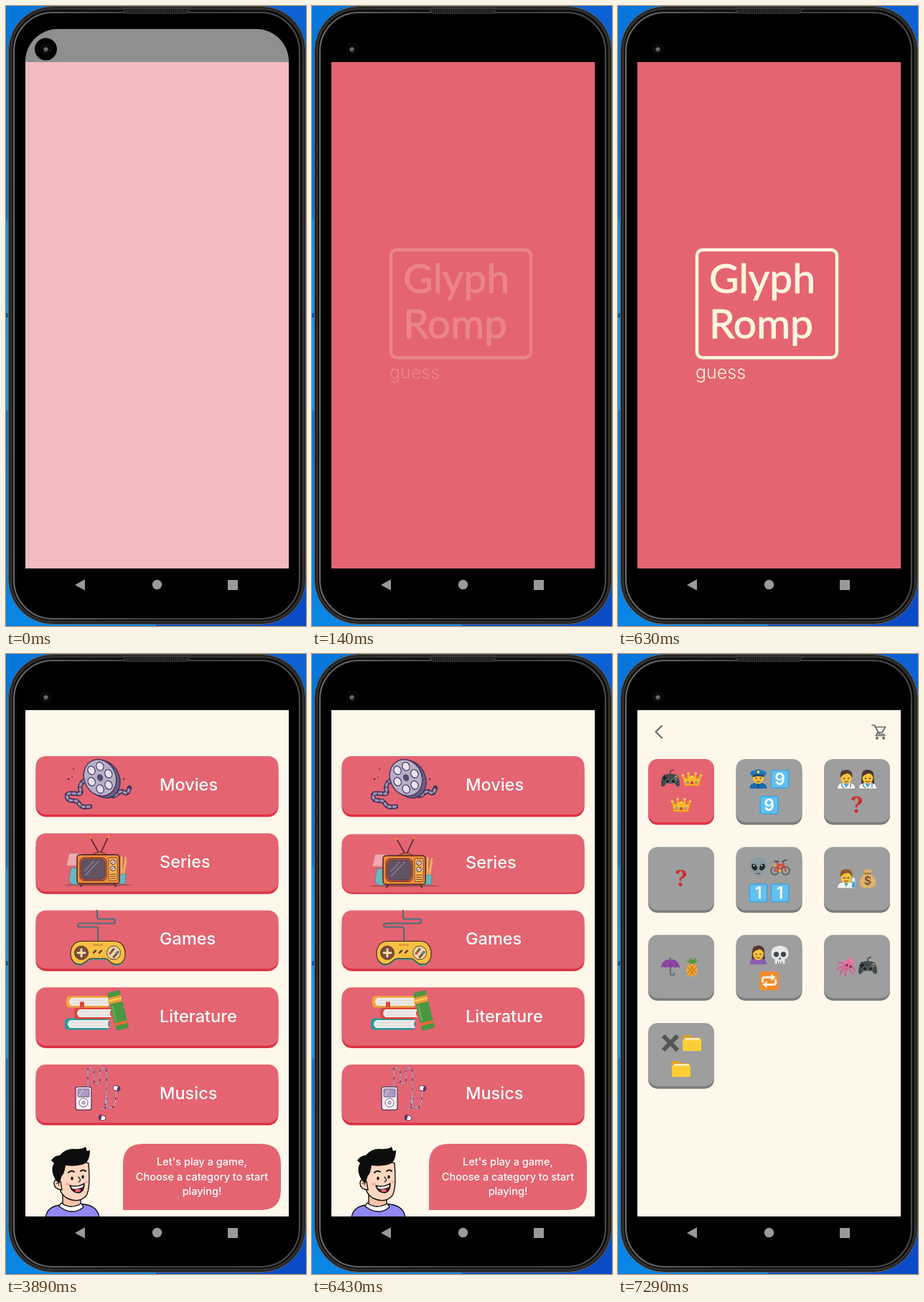
These frames come from a looping animation (418 px wide and 862 px high, 8 s). An HTML page:

```html
<!DOCTYPE html>
<html lang="en">
<head>
<meta charset="utf-8">
<title>Guessing app</title>
<style>
html, body { margin: 0; width: 100%; height: 100%; overflow: hidden; background: #000; }
svg { display: block; width: 100vw; height: 100vh; }
text { font-family: Inter, "Open Sans", sans-serif; }
</style>
</head>
<body>
<svg id="stage" viewBox="0 0 418 862" preserveAspectRatio="none">
  <defs>
    <linearGradient id="left" x2="0" y2="1">
      <stop offset="0" stop-color="#0876da"/><stop offset=".34" stop-color="#0678da"/>
      <stop offset=".35" stop-color="#1292ec"/><stop offset=".65" stop-color="#169cf4"/>
      <stop offset=".655" stop-color="#0878dc"/><stop offset="1" stop-color="#0a86e4"/>
    </linearGradient>
    <linearGradient id="right" x2="0" y2="1">
      <stop offset="0" stop-color="#0c62d4"/><stop offset="1" stop-color="#0b4cc6"/>
    </linearGradient>
    <linearGradient id="rim" x2="1" y2="0">
      <stop offset="0" stop-color="#6c6c6c"/><stop offset=".5" stop-color="#3c3c3c"/><stop offset="1" stop-color="#4a4a4a"/>
    </linearGradient>
    <pattern id="mesh" width="3" height="3" patternUnits="userSpaceOnUse">
      <rect width="3" height="3" fill="#161616"/><circle cx="1" cy="1" r=".8" fill="#5e5e5e"/>
    </pattern>
    <clipPath id="screen"><path d="M27 782V77A45 45 0 0 1 72 32H349A45 45 0 0 1 394 77V782Z"/></clipPath>
  </defs>

  <rect width="209" height="862" fill="url(#left)"/>
  <rect x="209" width="209" height="862" fill="url(#right)"/>
  <path d="M0 430H4" stroke="#075aa8" stroke-width="6"/>
  <path d="M417 332V450" stroke="#222" stroke-width="3"/>
  <rect x="3.5" y=".5" width="414" height="859" rx="62" fill="#1d1d1d" stroke="#67615d"/>
  <rect x="7" y="4" width="407" height="852" rx="58" fill="#080808" stroke="#303030" stroke-width="3"/>
  <rect x="11" y="9" width="398" height="843" rx="54" fill="#060606" stroke="url(#rim)" stroke-width="2"/>
  <rect x="15" y="12" width="391" height="837" rx="50"/>
  <path d="M163 3H257L253 10H167Z" fill="url(#mesh)" stroke="#444"/>

  <g clip-path="url(#screen)">
    <g id="splash">
      <rect x="27" y="78" width="367" height="704" fill="#e56471"/>
      <g id="logo" fill="#fff5e1">
        <rect x="110" y="339" width="195" height="150" rx="8" fill="none" stroke="#fff5e1" stroke-width="4.4"/>
        <g style="font:57px Lato,sans-serif" stroke="#fff5e1" stroke-width="1" stroke-linejoin="round">
          <text x="127" y="399" style="font:inherit">Glyph</text>
          <text x="127" y="462" style="font:inherit">Romp</text>
        </g>
        <text x="108" y="518" font-size="25" font-weight="300">guess</text>
      </g>
      <rect id="veil" x="27" y="32" width="367" height="750" fill="#fff"/>
    </g>
    <g id="menu"></g>
    <g id="levels"></g>
  </g>

  <circle cx="55.5" cy="60" r="15.5"/>
  <circle cx="55.5" cy="60" r="9" fill="#090909"/>
  <circle cx="55.5" cy="60.5" r="3.2" fill="#555"/>
  <path d="M53.5 59l2 2M56 58.500l1.500 1" stroke="#aaa"/>
  <path d="M96 805L110 797V812.500Z" fill="#999"/>
  <circle cx="210.500" cy="804.500" r="6.700" fill="#999"/>
  <rect x="309" y="798" width="14" height="14" fill="#999"/>
</svg>
<script>
const LOOP = 8000, CREAM = '#fff8ea', PINK = '#e56471', RED = '#dc3345';
const byId = id => document.getElementById(id);
const rect = (x, y, w, h, r, fill, more = '') =>
  `<rect x="${x}" y="${y}" width="${w}" height="${h}" rx="${r}" fill="${fill}" ${more}/>`;
const disc = (x, y, r, fill, more = '') => `<circle cx="${x}" cy="${y}" r="${r}" fill="${fill}" ${more}/>`;
const oval = (x, y, rx, ry, fill, more = '') =>
  `<ellipse cx="${x}" cy="${y}" rx="${rx}" ry="${ry}" fill="${fill}" ${more}/>`;
const path = (d, fill, more = '') => `<path d="${d}" fill="${fill}" ${more}/>`;
const line = (d, color, w = 1, more = '') =>
  path(d, 'none', `stroke="${color}" stroke-width="${w}" stroke-linecap="round" stroke-linejoin="round" ${more}`);
const ink = (color, w = 1) => `stroke="${color}" stroke-width="${w}" stroke-linejoin="round"`;
const move = (x, y, body, more = '') => `<g transform="translate(${x} ${y}) ${more}">${body}</g>`;
const label = (x, y, size, str, more = '') => `<text x="${x}" y="${y}" font-size="${size}" ${more}>${str}</text>`;

// Category pictures, placed relative to the top of their button
function reel() {
  const tape = 'M121 42C112 26 100 38 104 48S84 46 85 56S97 58 101 65S109 71 117 70M146 53C152 61 157 45 164 50S171 45 172 44';
  let holes = '';
  for (let i = 0; i < 6; i++) {
    const a = i * Math.PI / 3;
    holes += oval(13 * Math.cos(a), 16.5 * Math.sin(a), 5, 6, '#e6e2ee', ink('#51406b', 1.3));
  }
  return line(tape, '#46365c', 6.5) + line(tape, '#a596b4', 3.2, 'stroke-dasharray="3 4"') +
    move(136, 32, oval(0, 0, 22, 27, '#6c5e83', ink('#46365c', 1.5)), 'rotate(-25)') +
    move(131, 30, oval(0, 0, 22, 26, '#b6afc6', ink('#46365c', 1.5)) + holes + oval(0, 0, 4, 5, '#5a4972'), 'rotate(-25)') +
    disc(87, 32, 1.3, '#46365c') + disc(94, 18, 1, '#46365c') + disc(164, 32, 1.2, '#46365c') + disc(92, 29, .8, '#46365c');
}

function tv() {
  const dark = '#5d2c35';
  return oval(128, 72, 49, 1.3, '#9d5044') +
    path('M91 48H102L106 62Q106 70 101 71H93Q87 69 88 61Z', '#6cb6bf', ink('#4a7f8b', .7)) +
    path('M88 28H106L109 45H84Z', '#efa9af', ink('#c67d86', .8)) +
    line('M158 58L156 37M161 58L161 33M164 58L167 34M167 40L164 52', '#e4b95a', 2.5) +
    path('M149 57H168Q165 64 167 70H151Z', '#65b6be', ink('#437f8b', .7)) +
    line('M131 30L118 7M131 30L142 6', dark, 1.8) + disc(118, 6, 2, '#f08a35') + disc(142, 5, 2, '#f08a35') +
    path('M120 30Q130 22 141 30Z', '#d96a36', ink(dark)) +
    line('M106 71l-2 3M151 71l2 3', dark, 2) +
    rect(99, 30, 59, 40, 4, '#f18d35', ink(dark, 1.7)) +
    rect(103, 34, 37, 32, 6, '#c35f36', ink(dark)) + rect(105, 36, 33, 28, 6, '#615364', ink(dark, .7)) +
    line('M110 52L122 39M111 58L129 39', '#83748a', 2) +
    rect(143, 34, 12, 32, 2, '#ffb64a', ink(dark, .8)) +
    disc(149, 40, 3.4, '#e8e0d4', ink(dark)) + disc(149, 49, 3.4, '#e8e0d4', ink(dark)) +
    line('M147 42l4 -4M147 51l4 -4M145 57h8M145 60h8M145 63h8', dark, .9);
}

function gamepad() {
  const dark = '#5b382e';
  const body = 'M105 43H151C161 43 166 51 166 60C166 71 160 75 153 75C146 75 143 67 138 67H119C113 67 110 75 103 75C96 75 90 70 90 60C90 50 96 43 105 43Z';
  const cord = 'M127 0V9Q127 12 130 12H149Q152 12 152 15T149 18H104Q100 18 100 20.500T104 23H125Q128 23 128 27V43';
  return line(cord, '#45505f', 2) + line(cord, '#58a4a2', .7) +
    move(0, 2, path(body, '#3f9d9c')) + path(body, '#f7bf43', ink(dark, 1.4)) +
    disc(105, 59, 9.500, '#7a4c3b', ink(dark)) + line('M105 54V64M100 59H110', '#f3d8a6', 3) +
    disc(150, 59, 9.500, '#e9d5a3', ink(dark)) + line('M145 60l5 -6M150 65l6 -7', '#7b4a57', 3) +
    disc(146, 59, 1.700, '#d94f49') + disc(154, 59, 1.700, '#47a6a4') +
    line('M122 59l3 -3M130 59l3 -3', dark, 2.4) + rect(121, 47, 14, 2, 1, '#d38e35');
}

function books() {
  const book = (x, y, w, c) => rect(x, y, w, 16, 5, c) +
    path(`M${x + w} ${y + 2.500}H${x + 7}Q${x + 1} ${y + 8} ${x + 7} ${y + 13.500}H${x + w}Q${x + w - 4} ${y + 8} ${x + w} ${y + 2.500}Z`, '#eeebe9') +
    line(`M${x + 9} ${y + 6}H${x + w - 5}M${x + 9} ${y + 10}H${x + w - 4}`, '#d4cccc', .8);
  return book(82, 43, 62, '#239b9c') + book(95, 28, 52, '#d8483f') + book(84, 12, 60, '#efa83d') +
    path('M103 20h6v9l-3 -2l-3 2Z', '#d8483f') +
    move(156, 32, rect(-9, -27, 18, 54, 2, '#4b9641') + rect(-9, -20, 18, 9, 0, '#f49a35') +
      rect(-9, -17, 18, 2.500, 0, '#ffd05a') + rect(-9, 16, 18, 4, 0, '#e96b3a') + line('M-6 -8V13', '#6bb357', 2), 'rotate(-14)');
}

function player() {
  const dark = '#593963';
  const wire = 'M114 30V7Q114 3 119 5Q123 6 123 12V25Q127 30 131 23V7Q138 1 140 9V56Q140 61 132 62M140 45Q134 62 148 60Q154 58 153 34';
  return line(wire, dark, 1.5) + line(wire, '#f3e8f3', .9, 'stroke-dasharray="9 4"') +
    line(wire, '#62b4d6', .9, 'stroke-dasharray="3 16"') +
    rect(97, 31, 22, 32, 3, '#f2eaf1', ink(dark, 1.3)) + rect(100, 34, 16, 11, 1, '#aa9bc1', ink(dark, .7)) +
    disc(108, 53, 6, '#fff', ink(dark, .8)) + disc(108, 53, 2.2, '#d6c9dc', ink(dark, .7)) +
    line('M102 43l5 -8', '#cec3da', 1.4) +
    move(154, 33, oval(0, 0, 5, 3.500, '#fff', ink(dark)) + oval(3, 0, 2, 4, dark), 'rotate(15)') +
    move(134, 74, oval(0, 0, 5, 3.500, '#fff', ink(dark)) + oval(-3, 0, 2, 4, dark), 'rotate(15)');
}

function host() {
  const b = ink('#111', 1.4);
  return path('M55 784Q57 768 76 766L108 765Q128 767 130 784Z', '#8f88f6', b) +
    path('M79 745V768Q92 778 104 768V752Z', '#f8c3aa', b) +
    path('M77 763Q89 773 105 764L108 769Q93 782 74 768Z', '#fff', b) +
    path('M73 716Q70 750 86 757Q101 764 111 754Q118 746 115 708L96 702Z', '#ffd6bf', b) +
    path('M76 733Q67 728 67 736T78 745Z', '#ffd6bf', b) + line('M70 736q3 -1 4 3', '#111') +
    path('M74 737L69 731Q61 717 67 708L63 704Q68 697 75 697Q82 688 94 688Q106 689 111 685L113 691L117 690Q117 707 106 710Q94 713 83 711Q81 724 78 725Z', '#0c0c0c') +
    line('M87 721q4 -4 8 -1M104 719q4 -3 7 0', '#111', 2) +
    oval(92, 729, 1.700, 2.500, '#111') + oval(107, 727, 1.700, 2.500, '#111') +
    line('M101 727q5 5 0 7', '#111', 1.2) +
    path('M89 739Q99 742 109 736Q109 748 101 749Q92 749 89 739Z', '#4b1a1f', b) +
    path('M91 740Q99 742 108 738L107 741Q99 745 92 743Z', '#fff') + oval(100, 746, 4, 2, '#e2656b') +
    oval(86, 737, 3, 1.700, '#f7a99b') + oval(112, 734, 2, 1.600, '#f7a99b');
}

function button(name, art, i) {
  const y = 142 + i * 107.2;
  return move(0, y, rect(41.5, 6, 338, 78.500, 14, RED) +
    `<g id="face${i}">${rect(41.5, 0, 338, 81, 14, PINK)}` +
    label(214, 48, 23.500, name, 'fill="#fff" font-weight="500"') + `<g class="art">${art()}</g></g>`);
}

// Small icons, centred on the origin, about 28 units wide
const person = (hair, coat, extra = '', long = false) =>
  (long ? path('M-9 9Q-10 -13 0 -13T9 9Z', hair) : '') +
  path('M-12 13Q-12 6 -4 5H4Q12 6 12 13Z', coat) +
  oval(0, -2, 7.500, 9, '#f8c33a') + path('M-8 -2Q-10 -13 0 -13T8 -2Q6 -7 2 -8Q-5 -7 -8 -2Z', hair) +
  disc(-3, -1, 1, '#40352e') + disc(3, -1, 1, '#40352e') + line('M-2.500 3q2.500 2 5 0', '#80452d', 1.2) + extra;
const scope = path('M-4 6L0 12L4 6Z', '#58a6cf') + line('M-6 6Q-7 11 -3 12M6 6V11', '#617584', 1.2);
const digit = n => rect(-13, -13, 26, 26, 3, '#3aa6df') + rect(-11.500, -11.500, 23, 23, 2, '#61c0ee') +
  label(0, 8, 23, n, 'fill="#fff" font-weight="600" text-anchor="middle"');
const tyre = x => disc(x, 5, 5.500, 'none', ink('#56636b', 1.8)) + disc(x, 5, 1.300, '#888');

const icons = {
  pad: path('M-9 -6Q0 -9 9 -6Q13 -2 13 8Q11 14 6 6H-6Q-11 14 -13 8Q-13 -2 -9 -6Z', '#444a4d') +
    line('M0 -8Q-1 -12 4 -13', '#444a4d', 1.6) + disc(-4, 3, 3, '#23282a', ink('#70777a')) +
    disc(4, 3, 3, '#23282a', ink('#70777a')) + line('M-8 -4V1M-10.500 -1.500H-5.500', '#1c2022', 2) +
    disc(8, -4, 1.2, '#e3b72e') + disc(6, -2, 1.2, '#4c8dcc') + disc(10, -2, 1.2, '#dc4a42') + disc(8, 0, 1.2, '#5eaa52'),
  crown: path('M-10 9L-13 -5L-7 0L-5 -8L0 0L5 -8L7 0L13 -5L10 9Z', '#fdb92b', ink('#e78d1c')) +
    [-12.500, -5, 5, 12.500].map((x, i) => disc(x, i % 3 ? -8 : -5, 1.8, '#ffd34c')).join('') +
    disc(0, -3, 2, '#ffd34c') + line('M-9 6H9', '#f2952b', 2) + disc(0, 5, 2.2, '#d64141') + disc(-6, 4, 1.6, '#4d9bc7') + disc(6, 4, 1.6, '#4d9bc7'),
  cop: person('#543930', '#1768ae', path('M-10 -5Q-14 -11 -6 -12L0 -14L6 -12Q14 -11 10 -5Q0 -8 -10 -5Z', '#1e77bd') +
    path('M-8 -5Q0 -9 8 -5L6 -3Q0 -5 -6 -3Z', '#27475e') + disc(0, -10, 2, '#ffd045') + line('M0 7V12', '#12466f', 2)),
  nine: digit(9),
  one: digit(1),
  doc: person('#543930', '#f2f4f5', scope),
  nurse: person('#483633', '#f2f4f5', scope, true),
  ask: label(0, 11, 32, '?', 'text-anchor="middle" fill="#c83230" style="font-family:\'Noto Serif\',serif;font-weight:700"'),
  alien: path('M0 -13Q12 -13 12 -3Q11 6 3 12Q0 14 -3 12Q-11 6 -12 -3Q-12 -13 0 -13Z', '#899aa1') +
    oval(-5.500, 0, 3.500, 5, '#20282c', 'transform="rotate(-30 -5.500 0)"') + oval(5.500, 0, 3.500, 5, '#20282c', 'transform="rotate(30 5.500 0)"') +
    disc(-6, -2, 1, '#fff') + disc(5, -2, 1, '#fff') + line('M-2 9h4', '#414f55', 1.3),
  bike: tyre(-7) + tyre(8) + line('M-7 5L-3 -3H5L0 5H-7M0 5L-4 -7M8 5L4 -8', '#d9433b', 2) +
    line('M-7 -8H-2M4 -8L9 -10', '#4b5960', 2.2) + line('M-9 -2l4 1', '#f4a53c', 2) + disc(0, 5, 2, '#f0b33c'),
  lab: person('#8a5a35', '#f2f4f5', path('M-3 6L0 12L3 6Z', '#69a7a7') + line('M-5 -1H5', '#6b7f88', 1) +
    line('M10 1V11', '#dceef5', 4.500) + line('M10 6V11', '#42a6df', 4)),
  bag: path('M-4 -7Q-7 -13 -3 -12L0 -13L3 -12Q7 -13 4 -7Q12 0 11 8Q10 13 0 13T-11 8Q-12 0 -4 -7Z', '#dfb46a') +
    line('M-4 -7H4', '#9b6f3b', 2) + label(0, 9, 16, '$', 'text-anchor="middle" font-weight="600" fill="#735031"'),
  umbrella: line('M0 -12V9Q0 12 3 12T5 9', '#6f6973', 2) + path('M-13 2Q-12 -10 0 -10T13 2Q10 -1 7 2Q4 -1 0 2Q-4 -1 -7 2Q-10 -1 -13 2Z', '#8740a0') +
    line('M-6 1Q-5 -6 0 -10Q5 -6 6 1', '#a05ab6'),
  pineapple: path('M-1 -3L-8 -9L-3 -8L-3 -13L1 -9L6 -13L5 -8L9 -8L2 -3Z', '#5c963a') + oval(0, 5, 7.500, 9, '#f5ad2f') +
    line('M-6 1L3 12M-3 -2L6 9M6 1L-3 12M3 -2L-6 9', '#c57525', 1.2),
  woman: person('#543930', '#8e5bb0', '', true),
  skull: path('M0 -13Q13 -12 12 -1Q12 4 7 6V12H-7V6Q-12 4 -12 -1Q-13 -12 0 -13Z', '#e5e7e8') +
    disc(-5, -1, 3.600, '#414649') + disc(5, -1, 3.600, '#414649') + path('M0 3L2 6H-2Z', '#414649') +
    line('M-3 9V12M0 9V12M3 9V12', '#71787b'),
  repeat: rect(-13, -13, 26, 26, 3, '#f58b2a') +
    line('M-9 1V-3Q-9 -5 -7 -5H5M9 -1V3Q9 5 7 5H-5', '#fff', 2.8) + path('M3 -10L9 -5L3 0ZM-3 0L-9 5L-3 10Z', '#fff'),
  squid: path('M9 -12Q13 -5 7 1Q3 5 -1 1Q-6 -2 -2 -7Q3 -12 9 -12Z', '#e56f9f') +
    line('M-1 -2Q-8 -8 -11 -4M-1 0Q-10 -1 -12 4M0 2Q-8 4 -8 11M2 3Q-3 8 -1 12M5 2Q6 8 10 10M7 0Q11 2 12 6', '#dc6194', 2.5) +
    disc(1, -2, 1.600, '#4b3040') + disc(6, 0, 1.600, '#4b3040') + line('M4 -9q4 -1 4 3', '#f39cbd', 1.4),
  cross: line('M-10 -10L10 10M10 -10L-10 10', '#535657', 6, 'style="stroke-linecap:butt"'),
  folder: path('M-13 -9Q-13 -11 -11 -11H-3L0 -8H11Q13 -8 13 -6V10H-13Z', '#e69d23') +
    rect(-10, -7, 21, 14, 0, '#fff5cf') + path('M-13 -5H13V9Q13 11 11 11H-11Q-13 11 -13 9Z', '#fccd37') + line('M-12 -4H12', '#ffe071', 1)
};

const cards = ['pad crown|crown', 'cop nine|nine', 'doc nurse|ask', 'ask', 'alien bike|one one',
  'lab bag', 'umbrella pineapple', 'woman skull|repeat', 'squid pad', 'cross folder|folder'];

function card(spec, i) {
  const rows = spec.split('|');
  const body = rows.map((row, r) => {
    const names = row.split(' ');
    const y = rows.length > 1 ? 28 + 36 * r : 44;
    return names.map((n, k) => move(46 + 30 * (k - (names.length - 1) / 2), y, icons[n])).join('');
  }).join('');
  return move(42 + i % 3 * 122.5, 146 + Math.floor(i / 3) * 122.3,
    rect(0, 5, 92, 86.500, 13, i ? '#7b7b7b' : RED) + rect(0, 0, 92, 88, 13, i ? '#9e9e9e' : PINK) + body);
}

const page = rect(27, 78, 367, 704, 0, CREAM);
const items = [['Movies', reel], ['Series', tv], ['Games', gamepad], ['Literature', books], ['Musics', player]];
const speech = ["Let's play a game,", 'Choose a category to start', 'playing!'];

byId('menu').innerHTML = page + items.map(([name, art], i) => button(name, art, i)).join('') +
  path('M163 773V709Q163 681 191 681H355Q383 681 383 709V745Q383 773 355 773Z', PINK) +
  speech.map((s, i) => label(273, 711 + i * 20.500, 14.500, s, 'text-anchor="middle" fill="#fff" font-weight="500"')).join('') +
  `<g class="art">${host()}</g>`;

byId('levels').innerHTML = page +
  line('M61 100L52.500 108L61 116.500', '#666', 2.1) +
  line('M354 99H357.500L364 111.500H371M358.500 101.500H372.500L368 109H362M362 109L359.500 113.500H372', '#666', 1.7) +
  disc(361, 117, 1.900, '#666') + disc(370, 117, 1.900, '#666') + cards.map(card).join('');

const art = document.querySelectorAll('.art');
const show = (el, on) => { el.style.display = on ? '' : 'none'; };
const fadeSteps = [0, 70, 140, 350, 490, 560, 630];

function update(t) {
  show(byId('splash'), t < 3750);
  show(byId('menu'), t >= 3750 && t < 7290);
  show(byId('levels'), t >= 7290);
  byId('veil').setAttribute('opacity', t < 70 ? .56 : t < 140 ? .227 : 0);
  const held = fadeSteps.filter(s => s <= t).pop();
  byId('logo').setAttribute('opacity', held / 630);
  art.forEach(el => show(el, t >= 3890));
  const pressed = t >= 6430 && t < 6500;
  byId('face1').setAttribute('transform', `translate(0 ${pressed ? 1.2 : 0})`);
}

const start = performance.now();
function tick() {
  update((performance.now() - start) % LOOP);
  requestAnimationFrame(tick);
}
tick();
</script>
</body>
</html>
```
